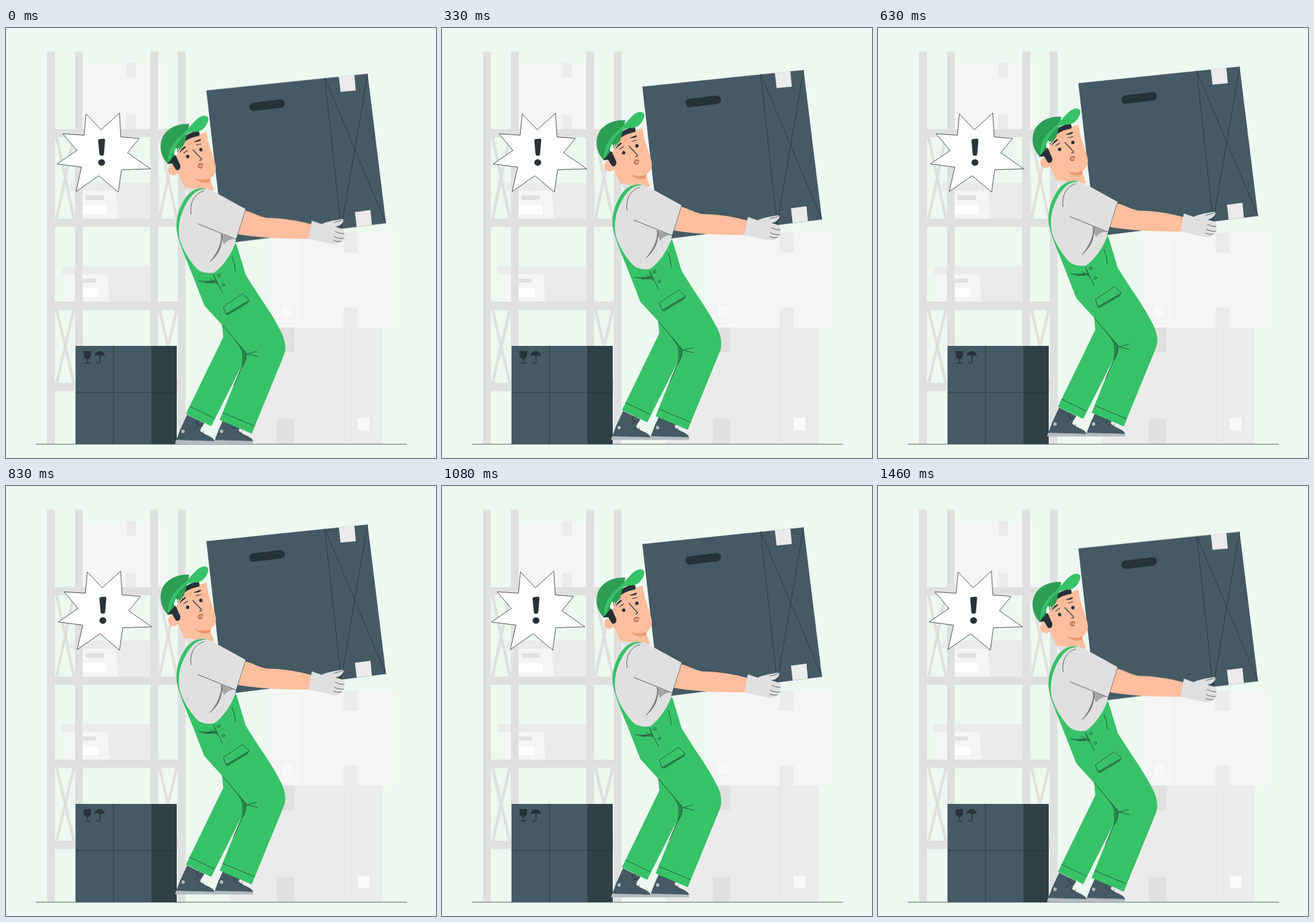
An HTML page that plays this animation: 748x748 px, repeating every 1500 ms.

```html
<!DOCTYPE html>
<html lang="en">
<head>
<meta charset="utf-8">
<title>Heavy lifting</title>
<style>
  html, body { margin: 0; width: 100%; height: 100%; overflow: hidden; background: #ecf8f0; }
  svg { display: block; width: 100vw; height: 100vh; }

  .rack { fill: #e0e0e0; }
  .pale { fill: #f5f5f5; }
  .mid { fill: #ebebeb; }
  .white { fill: #fafafa; }
  .slate { fill: #455a64; }
  .ink { fill: #263238; }
  .green { fill: #37c268; }
  .shade { fill: #26884a; }
  .skin { fill: #ffbe9d; }
  .blush { fill: #eb996e; }
  .line { fill: none; stroke: #263238; stroke-width: .8; stroke-linecap: round; stroke-linejoin: round; }
  .brace { fill: none; stroke: #e0e0e0; stroke-width: 5; }

  .lift { animation: lift 1.5s linear -18ms infinite; }
  .shake { animation: shake 1.5s linear -18ms infinite; }

  @keyframes lift {
    50% { transform: translateY(-15px); }
  }
  @keyframes shake {
    10%, 90% { transform: translateX(-1.5px); }
    20%, 80% { transform: translateX(3px); }
    30%, 50%, 70% { transform: translateX(-6px); }
    40%, 60% { transform: translateX(6px); }
  }
</style>
</head>
<body>
<svg viewBox="0 0 748 748" xmlns="http://www.w3.org/2000/svg">
  <defs>
    <g id="shoe">
      <path class="slate" d="M315 673 L345 688 L337 700 C343 708 360 710 363 719 L296 718 C298 711 301 705 303 699 Z"/>
      <path fill="#b4bbc0" d="M296 717 L362 719 Q365 723 361 723.5 L294 723.5 Z"/>
      <circle cx="308" cy="702" r="3" fill="#b4bbc0"/>
      <path class="line" stroke-width="1.5" d="M330 685 L338 693 M328 699 L335 691 M335 704 L339 698 M341 707 L344 702"/>
    </g>
    <g id="carton">
      <path class="mid" d="M97 414 H252 V476 H104 V428 H97 Z"/>
      <path class="pale" d="M104 428 H176 L180 476 H104 Z"/>
    </g>
  </defs>

  <!-- shelving -->
  <g>
    <path class="pale" d="M126 62 H271 V176 H126 Z"/>
    <path class="mid" d="M209 61 h17 v25 h-17 Z M209 151 h17 v25 h-17 Z M159 62 h.8 v114 h-.8 Z"/>
    <use href="#carton" x="15" y="-145"/>
    <use href="#carton"/>
    <path class="rack" d="M139 291 h31 v8 h-31 Z M134 436 h22 v7 h-22 Z"/>
    <path fill="#fff" d="M133 308 h42 v16 h-42 Z M133 453 h28 v15 h-28 Z"/>
    <path class="brace" d="M88 190 L118 331 M118 190 L88 331 M267 190 L297 331 M297 190 L267 331
      M88 490 L118 618 M118 490 L88 618 M267 490 L297 618 M297 490 L267 618"/>
    <path class="rack" d="M71.500 41 h13.500 V724 h-13.500 Z M120 41 h13.300 V724 h-13.300 Z M251 41 h13.500 V724 h-13.500 Z M299 41 h13.300 V724 h-13.300 Z
      M72 176 H312 v14 H72 Z M72 331.500 H312 v14.500 H72 Z M72 476 H312 v14.500 H72 Z M72 617 H312 v14.500 H72 Z"/>
  </g>

  <!-- pale stack -->
  <g>
    <path class="mid" d="M389 521 H655 V724 H389 Z"/>
    <path class="rack" d="M471 521 h30 v43 h-30 Z M471 680 h30 v44 h-30 Z M588 521 h.8 v203 h-.8 Z"/>
    <path class="pale" d="M461 356 H677 V521 H461 Z"/>
    <path class="mid" d="M587 356 h25 v35 h-25 Z M587 486 h25 v35 h-25 Z M515.500 356 h.8 v165 h-.8 Z"/>
    <path class="white" d="M480 484 h17 v18 h-17 Z M612 678 h20 v22 h-20 Z"/>
  </g>

  <path class="line" stroke-width=".7" d="M52 724 H697"/>

  <!-- floor box -->
  <g>
    <path class="slate" d="M121 553 H297 V724 H121 Z"/>
    <path fill="#313f46" d="M253 553 H297 V724 H253 Z"/>
    <path class="line" d="M187 553 V724 M121 634 H297"/>
    <path class="ink" d="M135 562 H148 V567 C148 573 145 576 142.500 576 V582 H147 V583.500 H136 V582 H141 V576 C138 576 135 573 135 567 Z
      M154 571 C155 559 171 559 172 571 C169 569 167 569 164 571 C161 569 157 569 154 571 Z"/>
    <path class="line" style="stroke-width:1.5" d="M163.500 570 V580 Q163 584 159.500 583 Q157.500 582 158 580"/>
  </g>

  <g class="shake">
    <path fill="#fff" stroke="#263238" stroke-width=".9" d="M139.500 149.500 L165.500 177 L197.500 148 L200 189.500 L232 192 L211.500 217
      L251.500 245 L201 246.500 L195.500 285.500 L161.500 257 L122 284.500 L131.500 242 L89 236.500 L123.500 213 L99 184 L136 186.500 Z"/>
    <path class="ink" d="M160.500 196 Q160.500 193.500 163 193.300 L170 192.500 Q173 192.500 172.500 196 L170.500 219.500 Q170 222 168 222 H165 Q163 222 162.700 219.500 Z"/>
    <ellipse class="ink" cx="166.500" cy="234" rx="6" ry="5.800"/>
  </g>

  <g class="lift">
    <!-- carried box -->
    <path class="slate" d="M348.500 109 L629 80 L661 340 L379 375.500 Z"/>
    <path class="line" d="M554.500 87.700 L583 349.500 L629 80 M554.500 87.700 L661 340"/>
    <path class="mid" d="M579 85 L606 82.200 L608.500 109 L582 111.500 Z M607 320.500 L634 317 L636.500 343 L610 346.300 Z"/>
    <path d="M430.500 137.500 L478 131.800" stroke="#263238" stroke-width="14.500" stroke-linecap="round"/>

    <use href="#shoe"/>
    <use href="#shoe" x="67"/>
    <path class="line" d="M331 684 C337 681 345 685 342 690 C338 696 333 692 331 684"/>

    <!-- head -->
    <path class="skin" d="M291 236 L311 279 Q337 287 362 283 L353 257 Z"/>
    <circle class="skin" cx="291.500" cy="247" r="9.500"/>
    <path class="skin" d="M290 212 L308 194 L349 181 C351 206 364 229 365 243 C366 257 355 265 344 265 C334 266 323 262 312 263 L294 249 Z"/>
    <path class="blush" d="M329 262.500 Q345 267 356 261.500 L354.500 268 Q341 273 329 262.500 Z"/>
    <path class="ink" d="M300 201 C310 186 325 179 335 180 Q338 184 336 188 C323 190 311 196 304 204 C299 210 297 217 295 221 L303 239 C305 246 298 250 295 246 L289 236 L280 237 Z"/>
    <path fill="#2d9f55" d="M281 236 C267 223 266 200 274 187 C284 172 302 166 319 167.500 L310 203 Z"/>
    <path class="green" d="M282 235 C281 213 292 198 305 187 C318 176 328 160 338 155 C347 150.500 354 154 351.500 162 C348 174 339 181 329 181 C312 180 297 197 287 226 Z"/>
    <path fill="#fff" d="M296 208 C293 214 291 218 293 221 C297 225 301 219 296 208 Z M300 209 L298 213 Q302 214 300 209 Z"/>
    <circle class="ink" cx="316" cy="224" r="2.900"/>
    <circle class="ink" cx="339" cy="212" r="2.900"/>
    <path class="ink" d="M301.500 218.500 C304 212 307 208 312 206 L313 208 C308 212 305 214 301.500 218.500 Z M326 198 Q332 196 338 193.500 L339.500 195.500 Q333 200 326 198 Z"/>
    <path class="line" style="stroke-width:1.200" d="M325 212 L340.500 228.500 Q340 230.500 336.500 230.500 M309 218 L316 213 M331 204 L339 202"/>
    <path d="M315 200 Q320 201 321 206 M320 197 L323 202" fill="none" stroke="#eb996e"/>
    <ellipse class="blush" cx="338.500" cy="240" rx="4.500" ry="4.200"/>
    <path class="line" d="M343 237.500 C337 234 332 240 335.500 243 Q338 245 341 243"/>

    <!-- shirt -->
    <path class="rack" d="M311 277 Q336 282 349 279 L369 289 L417 315.500 L400.500 368 L397 377 C386 406 374 426 358 430 L330 426 L298 370 L299 325 L317 287 Z"/>
    <path fill="#a6a6a6" d="M372 358 L397 367 Q386 368 379 377 Z M374 360 Q380 388 355 407 Q374 382 374 360 Z"/>
    <path class="line" d="M322 324 C319 304 328 288 344 284 M417 316 L400.500 368 L334 341 M376 360 C376 378 370 391 355 407"/>

    <!-- overalls -->
    <path class="green" d="M349 280 C331 276 317 286 308 303 C298 320 294 341 298 358 C302 376 311 397 322 424 L345 483 L376 517 L378 538 L313 671.500
      L357 693 L409.500 589 L371.500 682 L427.500 706 L484 568 C488 555 485 541 477 526 C467 506 453 485 438 463 L417 430 L401 377 L399 374
      C390 399 374 418 362 426 Q341 429 331 418 C316 401 306 382 302 367 C298 345 303 324 314 305 C324 288 333 281 349 280 Z"/>
    <path class="shade" d="M379 519 L418 566 Q419 579 409.500 592 C411 577 412 569 409 560 C400 544 391 535 379 519 Z
      M382 498 L423 474 L421 479 L386 500 Z M335 440 L363 440 L359 443 Z M361 429 L369 450 L363 440 Z"/>
    <path class="line" d="M376 517 L418 566 Q418 581 409.500 592 L396 623 M438 572 L419 567.500 L436 563 M319 658.500 L362 679 M378 670 L432 692.500
      M378.500 485 L411.500 462.500 L423.500 474 L383 498 Z M361 429 L376.500 461 M335 440 Q350 445 363 440 M347 443.500 L367 443 L355 437 M393.500 398 Q398 410 399 423"/>
    <circle class="line" cx="370" cy="431" r="2.500"/>
    <circle class="line" cx="378" cy="447.500" r="2.200"/>

    <!-- arm and glove -->
    <path class="skin" d="M416.500 318 C428 321 440 328 452 330.500 C480 331 507 335 532 342 L527 367 C489 367 440 366 403.500 359 Z"/>
    <path class="rack" d="M532 335.500 L549 341.500 C560 336 573 335 585 332.500 Q589 333.500 585.500 339 Q582 344 574 346 L587 350 Q591 354 588 359 Q590 365 587 367 Q587 372 583 372 Q580 377 570 376.500 C556 374 542 370 526 367.500 Z"/>
    <path class="line" d="M586 333.500 C580 338 576 336 570 339 M574 346 L585 349 M573 354.500 Q579 358 588 358.500 M571 363 Q578 367 587 366.500 M570 370 Q577 373 583 371.500"/>
  </g>
</svg>
</body>
</html>
```
